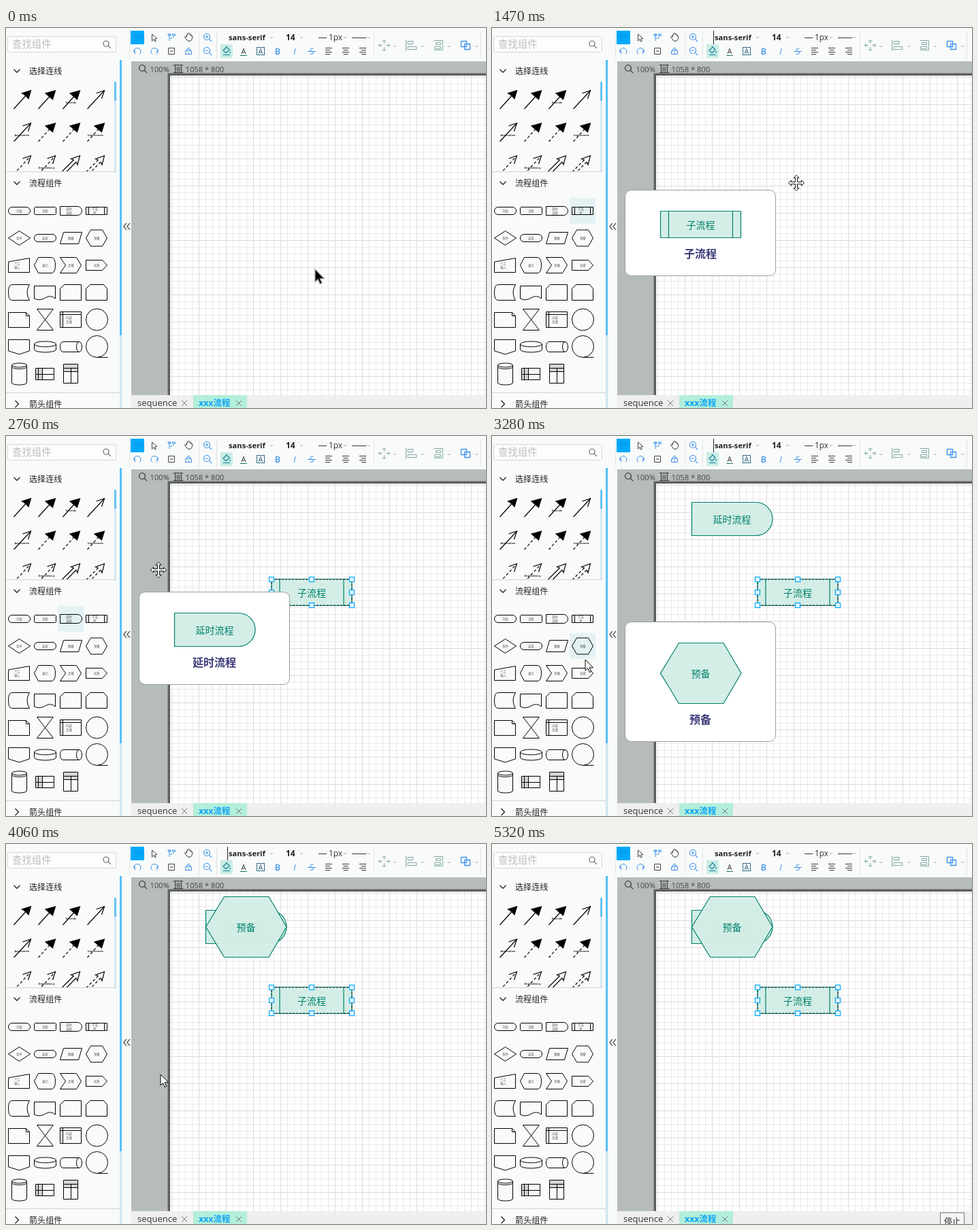
An HTML page for the animation above (5390 ms loop, 705 by 559 pixels).

```html
<!DOCTYPE html>
<html lang="zh-CN">
<head>
<meta charset="utf-8">
<title>流程图编辑器</title>
<style>
html, body { margin: 0; width: 100%; height: 100%; overflow: hidden; background: #f9fbfa; }
svg { display: block; width: 705px; height: 559px; font-family: "Open Sans", "Noto Sans CJK SC", "Noto Sans CJK", sans-serif; }
</style>
</head>
<body>
<svg id="stage" viewBox="0 0 705 559"></svg>
<script>
const BLUE = '#3f92e8', SKY = '#00a8ff', GREEN = '#00806c', MINT = '#d3eee7', TEAL = '#7fa9a4';
const rect = (x, y, w, h, fill, extra = '') => `<rect x="${x}" y="${y}" width="${w}" height="${h}" fill="${fill}" ${extra}/>`;
const path = (d, stroke = '#111', extra = '') => `<path d="${d}" fill="none" stroke="${stroke}" ${extra}/>`;
const text = (x, y, s, size, fill = '#222', extra = '') => `<text x="${x}" y="${y}" font-size="${size}" fill="${fill}" ${extra}>${s}</text>`;
const mid = (x, y, s, size, fill, extra = '') => text(x, y, s, size, fill, 'text-anchor="middle" ' + extra);
const group = (x, y, body, extra = '') => `<g transform="translate(${x} ${y}) ${extra}">${body}</g>`;
const chevron = (x, y, c = '#aaa', r = 2) => path(`M${x - r} ${y - r / 2}l${r} ${r} ${r} ${-r}`, c, r > 2 ? 'stroke-width="1.3"' : '');
const lens = (x, y, r, c, sign = '') => path(`M${x - r} ${y}a${r} ${r} 0 1 0 ${2 * r} 0a${r} ${r} 0 1 0 ${-2 * r} 0M${x + r * .7} ${y + r * .7}l4 4${sign}`, c, 'stroke-width="1.2"');
const cross = (x, y) => path(`M${x - 4} ${y - 4}l8 8m0-8l-8 8`, '#777');

// Shapes on the canvas, 118 px wide, anchored at the top left
const SHAPES = {
  sub: { name: '子流程', h: 39, d: 'M0 0H118V39H0ZM12 0V39M106 0V39' },
  delay: { name: '延时流程', h: 49, d: 'M0 0H94A24.5 24.5 0 0 1 94 49H0Z' },
  hex: { name: '预备', h: 89, d: 'M0 44.5L27 0H92.500L118.500 44.500 92.500 89H27Z' }
};
function shape(key, x, y) {
  const s = SHAPES[key];
  return group(x, y, path(s.d, GREEN, `style="fill:${MINT};fill-opacity:.97" stroke-width="1.2"`) +
    mid(59, s.h / 2 + 5.5, s.name, 14, GREEN));
}
function popup(key, y) {
  const s = SHAPES[key];
  return rect(195.5, y + .5, 221, s.h + 87, '#fff', 'rx="9" stroke="#9b9f9e"') +
    shape(key, 247.5, y + 31.5) +
    mid(306, y + s.h + 61, s.name, 16, '#3a3a78', 'font-weight="700"');
}

function toolbar() {
  let o = rect(183, 0, 522, 49, '#f9fbfa') + path('M181.5 3V45M283.500 4V45M309.500 4V45M540.500 5V45M697.500 5V45', '#e1e5e4');
  o += rect(183, 4, 20, 20, '#00a9fb') + path('M189 13h8m-7-2.500l-2 2.500 2 2.500m6-5l2 2.500-2 2.500', '#168bd0');
  o += path('M214.500 9V19l2.500-2.400 1.700 3.400 1.700-.8-1.700-3.400 3.300-.3Z', '#444');
  o += path('M240 9v10M240 15q6 1 6-4M238 9h4v2h-4ZM244.500 9h4v2h-4Z', BLUE);
  o += path('M264 15l-1.500-2q1-2 3 0V9.500q1-1.500 2 0V8q1.200-1.500 2 0v1.500q1-1.200 2 0v2q1.500-1.200 2 0v4q-1 4-4.500 4-3 0-5-4.500Z', '#333');
  o += lens(295, 13, 4.5, BLUE, 'M293 13h4m-2-2v4') + lens(295, 33, 4.5, BLUE, 'M293 33h4');
  const turn = path('M-3 4.500A5 5 0 1 1 3 4.500M-5-3v4h3', BLUE);
  o += group(193, 34, turn) + group(218, 34, turn, 'scale(-1 1)');
  o += path('M238.500 29.500h9v9h-9ZM240.500 34h5', '#444');
  o += path('M263.500 33.500h9v5h-9ZM265.500 33v-2h5v2M268 31v-3M268 36v2', BLUE);
  o += rect(315, 24, 18, 20, '#c9ede4') + path('M319 33l5-5 4 4-5 5ZM323 27l3 3M319 39.500h10M329 34v3', '#147fa0', 'stroke-width="1.2"');
  o += mid(349, 38, 'A', 11, '#333') + path('M344 40.500h10', '#16766c');
  o += rect(368.5, 28.5, 11, 11, 'none', 'stroke="#356d86"') + mid(374, 38, 'A', 10, '#235f82');
  o += mid(399, 39, 'B', 12.5, BLUE, 'font-weight="600"') + mid(424, 39, 'I', 12.5, BLUE, 'font-style="italic"');
  o += mid(449, 39, 'S', 12, BLUE) + path('M443 34.500h12', BLUE);
  [0, 1.5, 3].forEach((k, i) => {
    o += path([0, 1, 2, 3].map(r => `M${469 + i * 25 + (r % 2 ? k : 0)} ${29.5 + r * 3}h${r % 2 ? 7 : 10}`).join(''), '#333');
  });
  o += text(327, 18, 'sans-serif', 11.2, '#222', 'font-weight="700"') + text(411, 18, '14', 12, '#222', 'font-weight="700"');
  o += path('M459 14.500h12M508 14.500h21', '#333') + text(474, 18, '1px', 11.8, '#333');
  [[390, 14], [434, 14], [498, 14], [532, 14], [571, 27], [612, 27], [651, 27], [691, 27]].forEach(p => { o += chevron(...p); });
  o += path('M555.500 18v5m0 5v5M548 25.500h5m5 0h5M553 20l2.500-3 2.500 3M553 31l2.500 3 2.500-3M550 23l-3 2.500 3 2.500M561 23l3 2.500-3 2.500', TEAL);
  o += path('M587.500 17v17M590 19.500h8v4h-8ZM590 27.500h13v4h-13Z', TEAL);
  o += path('M628.500 18.500h13v14h-13M631.500 21.500h7v3h-7ZM629.500 27.500h9v3h-9Z', TEAL);
  o += path('M668.500 19.500h8v8h-8ZM673.500 23.500h8v8h-8Z', BLUE, 'stroke-width="1.3"');
  return o;
}

function canvas() {
  let o = rect(184, 49, 521, 491, '#b6bcba') + rect(237, 66, 468, 474, '#8d9291') + rect(238, 67, 467, 473, '#5d6261') + rect(241, 70, 464, 470, '#fff');
  const step = 10;
  let minor = '', major = '';
  for (let i = 0; i < 47; i++) {
    const x = 243.5 + i * step, y = 72.5 + i * step;
    const d = `M${x} 70V540` + (y < 540 ? `M241 ${y}H705` : '');
    if (i % 4) minor += d; else major += d;
  }
  o += path(minor, '#e9e9e9') + path(major, '#dcdcdc');
  o += lens(200, 59, 4.5, '#333') + text(211.5, 64.5, '100%', 11.2, '#444');
  o += path('M248.500 54.500h9v11h-9ZM246 54.500h14M246 65.500h14M250 58h6M250 60.500h6M250 63h6', '#333') + text(263.5, 64.5, '1058 * 800', 11.2, '#444');
  o += rect(171, 540, 534, 19, '#efefef') + rect(171, 0, 12.5, 559, '#f8faf9');
  o += rect(275, 540, 79, 19, '#b3eedd') + text(193, 556, 'sequence', 13, '#333') + cross(262, 552);
  o += text(283, 556, 'xxx流程', 12.4, '#0aa2f5', 'font-weight="700"') + cross(342, 552);
  return o + path('M177 287l-4 5 4 5M182 287l-4 5 4 5', '#333', 'stroke-width="1.2"');
}

// Connector samples: [head, dashed, label]
const LINKS = [
  ['notch'], ['full'], ['full', 0, 'Extends'], ['open'],
  ['open', 0, 'Association'], ['full', 1], ['full', 1], ['full', 1, 'Implements'],
  ['open', 1], ['open', 1, 'Dependency'], ['wide'], ['wide', 1]
];
const HEADS = {
  notch: 'M13-13L9.500-1 5.500-5.500 0-9Z', full: 'M13-13L9 0-1.500-9Z', open: 'M1-9L13-13 9-1',
  wide: 'M4-7L0-8.500 13-13 9.500 0 7.500-4'
};
function link([head, dash, label], i) {
  const style = dash ? 'stroke-dasharray="4 3"' : '';
  const shaft = head === 'wide' ? 'M4-7L-13 10M7.500-4L-9 13' : `M-12 14L${head === 'open' ? '13-13' : '6-6'}`;
  const fill = head === 'full' || head === 'notch' ? '#000' : 'none';
  let o = path(shaft, '#000', 'stroke-width="1.2" ' + style) +
    path(HEADS[head], '#000', `style="fill:${fill}" stroke-width="1.2"`);
  if (label) o += mid(0, 6, label, 4, '#000', 'font-weight="600"');
  return group(23.5 + (i % 4) * 36, 105 + Math.floor(i / 4) * 48, o);
}

// Palette items, centred on 0 0: path plus optional label lines
const ITEMS = [
  ['M-10.500-5.500h21a5.500 5.500 0 0 1 0 11h-21a5.500 5.500 0 0 1 0-11Z', '开始'],
  ['M-15-5.500H15l1 1v9l-1 1H-15l-1-1v-9Z', '流程'],
  ['M-16-6.500H9.500a6.500 6.500 0 0 1 0 13H-16Z', '延时 流程'],
  ['M-16-5.500H15V5.500H-16ZM-12-5.500v11M11-5.500v11', '子流 程'],
  ['M0-10.500L16 0 0 10.500-16 0Z', '条件'],
  ['M-10.500-5.500h21a5.500 5.500 0 0 1 0 11h-21a5.500 5.500 0 0 1 0-11Z', '结束'],
  ['M-11-8.500H16L11 8.500H-16Z', '数据'],
  ['M-9-12H8L15 0 8 12H-9L-16 0Z', '预备'],
  ['M-16-5L15-10.500V10.500H-16Z', '人工 输入'],
  ['M-10-11.500H10Q15-10 15 0T10 11.500H-10L-16 0Z', '展示'],
  ['M-16-11.500H8L15 0 8 11.500H-16L-8 0Z', '步骤'],
  ['M-16-7.500H8L15 0 8 7.500H-16Z', '标签'],
  ['M-11-11.500H15Q8 0 15 11.500H-11Q-16 11-16 0T-11-11.500Z'],
  ['M-16-9.500H15V9Q8 3 0 8T-16 9Z'],
  ['M-10-11.500H15V11.500H-16V-5.500Z'],
  ['M-10-11.500H10L15-5.500V11.500H-16V-5.500Z'],
  ['M-16-10.500H10L15-5.500V11.500H-16ZM10-10.500V-5.500H15'],
  ['M-12-15.500H12L-12 15.500H12Z'],
  ['M-16-11.500H15V11.500H-16ZM-16-7.500H15M-12-11.500v23', '内部 存储'],
  ['M-16 0a16 16 0 1 0 32 0a16 16 0 1 0-32 0Z'],
  ['M-16-10.500H15V6L0 11-16 6Z'],
  ['M-16-4a16 4 0 0 1 32 0V4a16 4 0 0 1-32 0ZM-16-4a16 4 0 0 0 32 0'],
  ['M-12-7.500H12a4 7.500 0 0 1 0 15H-12a4 7.500 0 0 1 0-15ZM12-7.500a4 7.500 0 0 0 0 15'],
  ['M-16-.5a16 16 0 1 0 32 0a16 16 0 1 0-32 0ZM0 15.500H16'],
  ['M-11-13a11 3 0 0 1 22 0V13a11 3 0 0 1-22 0ZM-11-13a11 3 0 0 0 22 0M-11-10.500a11 3 0 0 0 22 0'],
  ['M-14-8.500H13V8.500H-14ZM-14 .5H13M-10-8.500v17M-4-8.500v17'],
  ['M-11-14.500H10V13.500H-11ZM-11-8.500H10M-11-3.500H10M0-8.500V13.500']
];
function item([d, label], i) {
  const lines = label ? label.split(' ') : [];
  let o = '';
  if (i === 25) o += rect(-14, -9, 10, 18, '#d5d5d5');
  if (i === 26) o += rect(-11, -15, 22, 11, '#d5d5d5');
  o += path(d, '#000');
  lines.forEach((s, k) => { o += mid(lines.length > 1 ? -3 : 0, 1.8 + (k - (lines.length - 1) / 2) * 5.4, s, 4.3, '#555'); });
  return group(19.5 + (i % 4) * 38, 269 + Math.floor(i / 4) * 40, o);
}

function sidebar() {
  let o = rect(0, 0, 171, 559, '#f9fbfa') + rect(2.5, 12.5, 159, 23, '#fcfdfd', 'rx="2" stroke="#d3d6d6"');
  o += text(9, 29, '查找组件', 14.4, '#bcbfbf') + lens(147, 23, 4, '#666');
  o += '<clipPath id="links"><rect x="0" y="78" width="162" height="133"/></clipPath>';
  o += `<g clip-path="url(#links)">${LINKS.map(link).join('')}</g>`;
  o += path('M0 211.500H162M0 536.500H167', '#cfd2d2');
  o += chevron(16, 63, '#222', 4.5) + chevron(16, 228, '#222', 4.5) + path('M13.500 548l5 5-5 5', '#222', 'stroke-width="1.3"');
  [['选择连线', 68], ['流程组件', 233], ['箭头组件', 558]].forEach(([s, y]) => { o += text(34, y, s, 12.1); });
  o += rect(159, 79, 3, 132, '#d5eaf4') + rect(159, 79, 3, 28, '#66c3f5');
  return o + rect(167, 47, 3.5, 512, '#d2e7ef') + rect(167, 47, 3, 405, '#59c0f9');
}

function selection(x, y) {
  let o = rect(x, y, 118, 38, 'none', 'stroke="#222" stroke-dasharray="3 2"');
  for (let i = 0; i < 9; i++) {
    if (i !== 4) o += rect(x - 3.5 + (i % 3) * 59, y - 3.5 + Math.floor(i / 3) * 19, 7, 7, '#eaf7ff', `stroke="${SKY}" stroke-width="1.2"`);
  }
  return o;
}

function moveIcon() {
  let pts = [], q = [[0, -11.5], [4, -7.5], [1.5, -7.5], [1.5, -1.5], [7.5, -1.5], [7.5, -4]];
  for (let i = 0; i < 4; i++) {
    pts = pts.concat(q);
    q = q.map(([x, y]) => [-y, x]);
  }
  return `<polygon points="${pts.join(' ')}" fill="#fff" stroke="#111"/>`;
}
const ARROW = 'M0 0V16L3.700 12.600 6.300 18.600 8.700 17.600 6.200 11.800H11.500Z';
const POINTERS = {
  dark: path(ARROW, '#aaa', 'style="fill:#000;stroke:#999" transform="translate(1 0) scale(1.15)"'),
  arrow: path(ARROW, '#000', 'style="fill:#fff"'),
  move: moveIcon()
};

// Pointer waypoints: [step, x, y]
const WAY = [
  [0, 453, 355], [2, 640, 405], [4, 260, 310], [5, 129, 285], [7, 145, 280], [9, 421, 255], [10, 456, 222],
  [11, 447, 228], [12, 447, 228], [15, 133, 275], [16, 114, 277], [18, 95, 272], [20, 95, 272], [22, 353, 122],
  [24, 140, 312], [25, 137, 329], [26, 135, 312], [28, 353, 122], [29, 353, 125], [31, 227, 339], [34, 440, 434],
  [38, 618, 538], [40, 680, 550]
];
// Hover spans: [first step, end step, shape, popup top, column, row, popup delay]
const HOVERS = [
  [6, 13, 'sub', 238, 3, 0, 0], [15, 17, 'sub', 219, 3, 0, 0],
  [17, 22, 'delay', 229, 2, 0, 1], [24, 28, 'hex', 273, 3, 1, 0]
];
const CARET = [[260, 520], [1180, 2760], [3020, 3540], [3670, 4190], [4580, 5250]];
const within = (v, a, b) => v >= a && v < b;

function pointerAt(step) {
  const i = Math.max(0, WAY.findLastIndex(w => w[0] <= step)), a = WAY[i], b = WAY[i + 1] || a;
  const f = b === a ? 0 : (step - a[0]) / (b[0] - a[0]);
  return [1, 2].map(k => Math.round(a[k] + (b[k] - a[k]) * f));
}

const stage = document.getElementById('stage');
stage.innerHTML = canvas() + toolbar() + sidebar() + '<g id="hover"></g>' +
  ITEMS.map(item).join('') + '<g id="live"></g>';
const hover = document.getElementById('hover'), live = document.getElementById('live');

const stepAt = t => t < 1330 ? Math.min(9, Math.floor(t / 130)) : Math.floor((t - 30) / 130);
let last = '';
function draw(t) {
  const step = stepAt(t), h = HOVERS.find(s => within(step, s[0], s[1]));
  const caret = CARET.some(([a, b]) => within(t, a, b)), ended = t >= 5250;
  const key = [step, caret, ended].join();
  if (key === last) return;
  last = key;
  hover.innerHTML = h ? rect(114 - (3 - h[4]) * 38, 250 + h[5] * 40, 38, 38, '#e4f2f4') : '';
  let o = '';
  if (step >= 22) o += shape('delay', 293.5, 97.5);
  if (step >= 28) o += shape('hex', 293.5, 77.5);
  if (step >= 13) o += shape('sub', 390, 210.5) + selection(390, 211);
  if (h && step >= h[0] + h[6]) o += popup(h[2], h[3]);
  if (caret) o += path('M325.500 4V24', '#222');
  if (ended) {
    o += rect(658.5, 542.5, 35, 20, '#f6f6f6', 'stroke="#777"') + mid(676, 560, '停止', 12);
  } else {
    const kind = step === 0 ? 'dark' : within(step, 5, 24) || within(step, 26, 29) ? 'move' : 'arrow';
    o += group(...pointerAt(step), POINTERS[kind]);
  }
  live.innerHTML = o;
}

function tick() {
  draw(performance.now() % 5390);
  requestAnimationFrame(tick);
}
tick();
</script>
</body>
</html>
```
